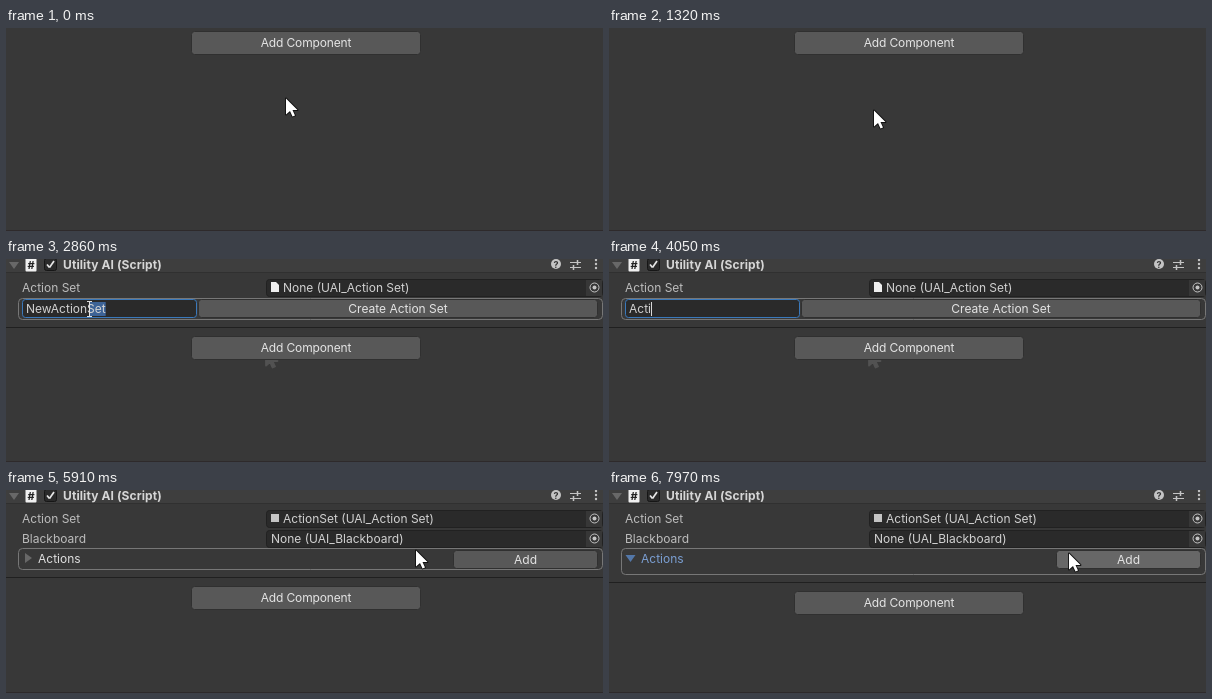
An HTML page with a canvas that plays this animation: 597 px wide and 203 px high, repeating every 8 s.

```html
<!DOCTYPE html>
<html lang="en">
<head>
<meta charset="utf-8">
<title>Inspector</title>
<style>
html, body { margin: 0; width: 100%; height: 100%; overflow: hidden; background: #383838; }
canvas { display: block; width: 597px; height: 203px; }
</style>
</head>
<body>
<canvas id="stage" width="597" height="203"></canvas>
<script>
const ctx = document.getElementById('stage').getContext('2d');
const LOOP = 8000;
const FONT = 'Inter, Roboto, sans-serif';
const BG = '#383838', FIELD = '#2a2a2a', EDGE = '#212121', TEXT = '#d2d2d2';
const ICON = '#c4c4c4', FOCUS = '#3a79bb', SELECTED = '#3d6396';

// Times of the hard changes.
const OPEN = 455, CLOSE = 1320, CHOOSE = 1390, LEAVE = 1980, FOCUS_AT = 2720;
const TYPE = 3580, TYPE_END = 4980, CREATE = 5775, HOVER_ADD = 6000, UNFOLD = 7560;
const TYPED = 'ActionSet';

const moves = [];
const go = (start, end, x, y) => moves.push({ start, end, x, y });
go(60, 520, 291, 17);
go(660, 1180, 265, 81);
go(1320, 1650, 260, 90);
go(1910, 2660, 110, 50);
go(2720, 3190, 26, 50);
go(4980, 5510, 338, 53);
go(5710, 6100, 456, 65);
go(6360, 6490, 459, 71);
go(6690, 7430, 20, 67);
go(7560, 7970, 460, 63);

const ease = p => p * p * (3 - 2 * p);

// Eased travel, advancing about every 66 ms.
function pointerAt(t) {
  let x = 280, y = 70;
  for (const m of moves) {
    if (t < m.start) break;
    const steps = Math.round((m.end - m.start) / 66) + 1;
    const gap = (m.end - m.start) / (steps - 1);
    const done = Math.min(steps, Math.floor((t - m.start) / gap + 0.001) + 1);
    const p = ease(done / steps);
    x += (m.x - x) * p;
    y += (m.y - y) * p;
  }
  return [Math.round(x), Math.round(y)];
}

// Typing starts slowly, hurries, then settles to an even pace.
function lettersAt(t) {
  const last = TYPED.length - 1;
  const pace = (TYPE_END - TYPE) / last;
  let n = 0;
  while (n <= last && t >= TYPE + pace * n - 70 * Math.sin(Math.PI * n / last) - 0.01) n++;
  return n;
}

function rect(x, y, w, h, color) {
  ctx.fillStyle = color;
  ctx.fillRect(x, y, w, h);
}

function box(x, y, w, h, fill, edge, r = 3) {
  ctx.beginPath();
  ctx.roundRect(x + 0.5, y + 0.5, w - 1, h - 1, r);
  if (fill) { ctx.fillStyle = fill; ctx.fill(); }
  if (edge) { ctx.strokeStyle = edge; ctx.lineWidth = 1; ctx.stroke(); }
}

function poly(points, fill, edge) {
  ctx.beginPath();
  points.forEach(([x, y]) => ctx.lineTo(x, y));
  ctx.closePath();
  if (edge) { ctx.strokeStyle = edge; ctx.lineWidth = 1.8; ctx.lineJoin = 'round'; ctx.stroke(); }
  ctx.fillStyle = fill;
  ctx.fill();
}

function line(x1, y1, x2, y2, color = ICON, width = 1) {
  ctx.beginPath();
  ctx.moveTo(x1, y1);
  ctx.lineTo(x2, y2);
  ctx.strokeStyle = color;
  ctx.lineWidth = width;
  ctx.stroke();
}

function ring(x, y, r) {
  ctx.beginPath();
  ctx.arc(x, y, r, 0, Math.PI * 2);
  ctx.strokeStyle = ICON;
  ctx.lineWidth = 1;
  ctx.stroke();
}

function dot(x, y, r) {
  ctx.beginPath();
  ctx.arc(x, y, r, 0, Math.PI * 2);
  ctx.fillStyle = ICON;
  ctx.fill();
}

function label(str, x, y, { color = TEXT, align = 'left', weight = 400, size = 12, spacing = 0 } = {}) {
  ctx.font = `${weight} ${size}px ${FONT}`;
  ctx.letterSpacing = `${spacing}px`;
  ctx.textAlign = align;
  ctx.textBaseline = 'alphabetic';
  ctx.fillStyle = color;
  ctx.fillText(str, x, y);
}

function button(str, x, y, w, h, hover, spacing) {
  box(x, y, w, h, hover ? '#676767' : '#585858', '#303030');
  label(str, x + w / 2, y + h / 2 + 4, { color: '#e4e4e4', align: 'center', spacing });
}

function addComponent(y, hover) {
  button('Add Component', 185, y, 230, 24, hover, -0.15);
}

function foldout(x, y, open, color) {
  poly(open ? [[x - 5, y - 3], [x + 5, y - 3], [x, y + 4]]
            : [[x - 3, y - 5], [x + 4, y], [x - 3, y + 5]], color);
}

function scriptIcon(x, y) {
  box(x, y, 12, 14, '#f0f0f0', null, 1);
  label('#', x + 6, y + 11, { color: '#222', align: 'center', weight: 700, size: 11 });
}

function popup() {
  rect(185, 27, 230, 176, '#232323');
  rect(186, 28, 228, 175, BG);
  box(190, 32, 219, 16, FIELD, FOCUS);
  ring(197.5, 39.5, 2);
  line(199, 41, 202, 44, ICON, 1.3);
  rect(204, 34, 19, 12, SELECTED);
  label('Util', 204, 44.5);
  line(398, 37, 404, 43);
  line(404, 37, 398, 43);
  rect(186, 52, 228, 1, '#232323');
  rect(186, 53, 228, 20, '#3c3c3c');
  rect(186, 73, 228, 1, '#303030');
  label('Search', 299, 68, { color: '#bdbdbd', align: 'center', weight: 600, size: 13 });
  rect(186, 74, 228, 20, '#3e5f96');
  scriptIcon(190, 77);
  label('Utility AI', 205, 89, { color: '#f0f0f0' });
  label('New script', 205, 109);
  line(404.5, 100.5, 409, 105, '#a0a0a0', 1.3);
  line(409, 105, 404.5, 109.5, '#a0a0a0', 1.3);
}

function header() {
  rect(0, 0, 597, 13, '#3e3e3e');
  rect(0, 13, 597, 1, '#303030');
  foldout(8, 6, true, '#686868');
  scriptIcon(19, -1);
  box(38, -1, 13, 13, FIELD, '#161616', 2);
  line(41, 5.5, 43.5, 8.5, '#e6e6e6', 1.7);
  line(43.5, 8.5, 48, 2, '#e6e6e6', 1.7);
  label('Utility AI (Script)', 57, 10, { weight: 700, color: '#d6d6d6', spacing: 0.1 });
  dot(550, 5, 5);
  label('?', 550, 8.5, { color: '#333', align: 'center', weight: 700, size: 9 });
  for (const [y, knob] of [[3.5, 571.5], [8.5, 567.5]]) {
    line(564, y, 575, y);
    line(knob, y - 2.5, knob, y + 2.5, ICON, 1.5);
  }
  for (const y of [1, 5, 9]) dot(590, y, 1.2);
}

function objectRow(y, name, value, x) {
  label(name, 16, y + 13, { color: '#bdbdbd' });
  box(260, y, 337, 18, FIELD, EDGE);
  rect(580, y + 1, 16, 16, '#373737');
  ring(588.5, y + 8.5, 4.5);
  dot(588.5, y + 8.5, 2);
  label(value, x, y + 13);
}

function pageIcon(x, y) {
  poly([[x, y], [x + 5, y], [x + 8, y + 3], [x + 8, y + 10], [x, y + 10]], '#efefef');
}

function group(y, h) {
  box(12, y, 585, h, null, '#777', 4);
}

function divider(y) {
  rect(0, y, 597, 1, '#202020');
}

function nameField(t, x) {
  const focused = t >= FOCUS_AT;
  const count = lettersAt(t);
  const str = count ? TYPED.slice(0, count) : 'NewActionSet';
  box(16, 40, 175, 19, FIELD, focused ? FOCUS : '#151515');
  ctx.font = `400 12px ${FONT}`;
  ctx.letterSpacing = '0px';
  const end = 20 + ctx.measureText(str).width;
  if (focused && !count) {
    const left = Math.min(end, x < 30 ? 20 : x);
    rect(left, 43, end - left, 14, SELECTED);
  }
  label(str, 20, 54);
  if (count) rect(Math.round(end), 43, 1, 14, '#d8d8d8');
}

// Tail of the pointer that stays behind on the panel.
function pointerTrace() {
  ctx.save();
  ctx.beginPath();
  ctx.rect(258, 101, 16, 10);
  ctx.clip();
  arrow([260, 90], '#525252', '#525252');
  ctx.restore();
}

function setupPanel(t, [x, y]) {
  header();
  objectRow(20, 'Action Set', 'None (UAI_Action Set)', 277);
  pageIcon(265, 23);
  group(39, 22);
  nameField(t, x);
  button('Create Action Set', 192, 40, 400, 19, x >= 192 && y >= 40 && y < 59);
  divider(68);
  addComponent(77, x >= 185 && y >= 77 && y < 101);
  if (t >= LEAVE) pointerTrace();
}

function actionsPanel(t) {
  const open = t >= UNFOLD;
  const grow = open ? 5 : 0;
  header();
  objectRow(20, 'Action Set', 'ActionSet (UAI_Action Set)', 277);
  rect(265, 24, 8, 8, ICON);
  objectRow(40, 'Blackboard', 'None (UAI_Blackboard)', 265);
  group(58, 22 + grow);
  foldout(open ? 21.5 : 22, 68, open, open ? '#5377a8' : '#686868');
  label('Actions', 32, 73, { color: open ? '#7b9fd3' : '#e0e0e0' });
  button('Add', 447, 60, 145, 19, t >= HOVER_ADD);
  divider(87 + grow);
  addComponent(96 + grow, false);
}

function arrow([x, y], fill = '#fff', edge = '#111') {
  const shape = [[0, 0], [0, 16], [4, 12.5], [6.5, 18], [9, 17], [6.5, 11.5], [11.5, 11.5]];
  poly(shape.map(([dx, dy]) => [x + dx, y + 0.5 + dy]), fill, edge);
}

function beam([x, y]) {
  rect(x, y - 7, 1, 14, '#e0e0e0');
  rect(x - 2, y - 8, 5, 1, '#e0e0e0');
  rect(x - 2, y + 7, 5, 1, '#e0e0e0');
}

function pointer(t, pos) {
  if (t >= TYPE && t < TYPE_END) return;
  const [x, y] = pos;
  const overField = t >= CHOOSE && t < CREATE && x > 16 && x < 191 && y > 40 && y < 59;
  (overField ? beam : arrow)(pos);
}

function draw(t) {
  const pos = pointerAt(t);
  rect(0, 0, 597, 203, BG);
  if (t < CHOOSE) {
    const open = t >= OPEN && t < CLOSE;
    addComponent(3, open || pos[1] < 27);
    if (open) popup();
  } else if (t < CREATE) {
    setupPanel(t, pos);
  } else {
    actionsPanel(t);
  }
  rect(0, 202, 597, 1, '#2e2a2b');
  pointer(t, pos);
}

const begin = performance.now();
function tick() {
  draw((performance.now() - begin) % LOOP);
  requestAnimationFrame(tick);
}
tick();
</script>
</body>
</html>
```
